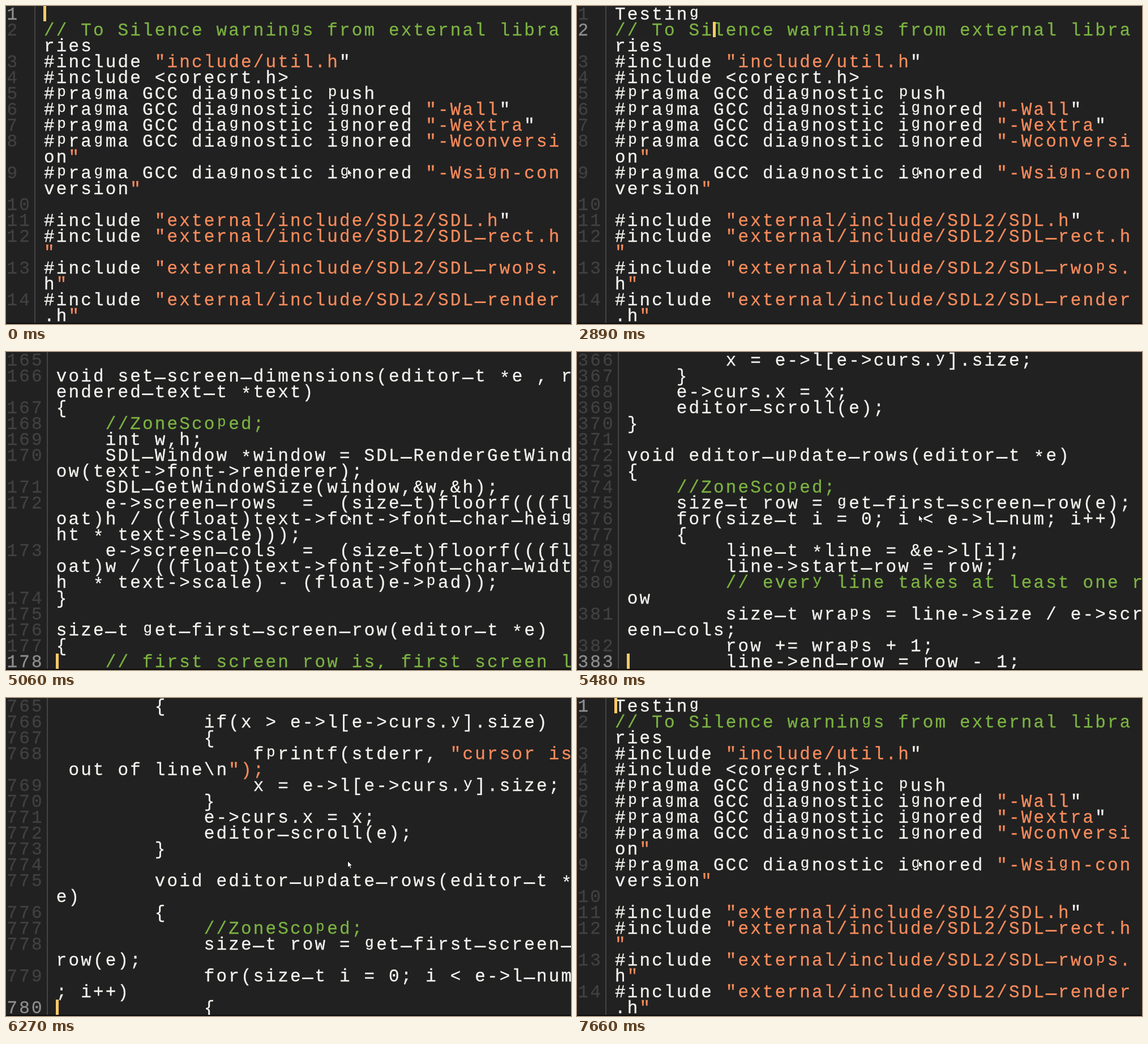
Animation of 998x561 px, one loop 8 s. Source, as an HTML page:

```html
<!DOCTYPE html>
<html lang="en">
<head>
<meta charset="utf-8">
<title>Code editor</title>
<style>
  html, body { margin: 0; width: 100%; height: 100%; overflow: hidden; background: #212121; }
  #stage { position: relative; width: 998px; height: 561px; overflow: hidden; background: #212121; }
  #stage div { position: absolute; }
  #text {
    left: 0; top: 0; white-space: pre; color: #f4f4f0; letter-spacing: 3.147px;
    font: 31px/28px "Liberation Mono", "DejaVu Sans Mono", monospace;
    -webkit-text-stroke: .3px;
  }
  .num { left: 1.5px; color: #414141; }
  .num.on { color: #8e8e8e; }
  .note { color: #7cb342; }
  .str { color: #fa8c5c; }
  /* The typeface has no descenders, a raised underscore and a centred star. */
  .low { position: relative; font-size: 26px; line-height: 0; letter-spacing: 6.147px; left: 1.5px; top: -4.5px; }
  .bar { position: relative; top: -7.5px; -webkit-text-stroke: 1.2px; }
  .star { position: relative; top: 4px; }
  #rule { top: 0; width: 2px; height: 559px; background: #444; }
  #caret { width: 5px; height: 27px; background: #ffcb66; }
  #edge { left: 0; top: 559px; width: 998px; height: 2px; background: #0d0d0d; }
  #mouse { position: absolute; left: 602px; top: 286px; }
</style>
</head>
<body>
<div id="stage">
  <div id="text"></div>
  <div id="rule"></div>
  <div id="caret"></div>
  <svg id="mouse" width="13" height="18" viewBox="0 0 13 18">
    <path d="M1.5 1.5V13L4.3 10.6L6.2 15L8.2 14.1L6.3 9.9H10Z" fill="#fff" stroke="#111"/>
  </svg>
  <div id="edge"></div>
</div>
<script>
const LOOP = 8000, CELL = 21.75, LINE = 28, ROWS = 20;
const $ = id => document.getElementById(id);
const pad = (n, s) => ' '.repeat(n) + s;
const sdl = name => `#include "external/include/SDL2/SDL${name}.h"`;
const ignored = flag => `#pragma GCC diagnostic ignored "-W${flag}"`;

const head = [
  '// To Silence warnings from external libraries',
  '#include "include/util.h"',
  '#include <corecrt.h>',
  '#pragma GCC diagnostic push',
  ...['all', 'extra', 'conversion', 'sign-conversion'].map(ignored),
  '',
  ...['', '_rect', '_rwops', '_render'].map(sdl)
];

const includes = ['h"', ...['events', 'image', 'surface', 'timer', 'scancode', 'video',
  'keycode', 'pixels', 'ttf', 'scancode'].map(name => sdl('_' + name))];

const floatOf = (size, gap) => `((float)text->font->font_char_${size}${gap}* text->scale)`;
const dimensions = [
  '',
  'void set_screen_dimensions(editor_t *e , rendered_text_t *text)',
  '{',
  '    //ZoneScoped;',
  '    int w,h;',
  '    SDL_Window *window = SDL_RenderGetWindow(text->font->renderer);',
  '    SDL_GetWindowSize(window,&w,&h);',
  `    e->screen_rows  =  (size_t)floorf(((float)h / ${floatOf('height', ' ')}));`,
  `    e->screen_cols  =  (size_t)floorf(((float)w / ${floatOf('width', '  ')} - (float)e->pad));`,
  '}',
  '',
  'size_t get_first_screen_row(editor_t *e)',
  '{',
  '    // first screen row is, first screen l'
];

const keyTest = key => `ray[SDL_SCANCODE_LCTRL]) && (keyboard_state_array[SDL_SCANCODE_${key}]))`;
const keys = [
  keyTest('RIGHT'),
  pad(16, '{'),
  pad(20, 'move_cursor_to_next_word(e);'),
  pad(16, '}'),
  pad(16, 'else if((keyboard_state_ar') + keyTest('PAGEDOWN'),
  pad(16, '{'),
  pad(20, 'for (size_t i =0 ; i< e->screen_rows;i++) {'),
  pad(24, 'if(e->curs.y < e->l[e->l_num-1].end_row){'),
  pad(28, 'move_cursor_down(e);'),
  pad(28, 'editor_scroll(e);'),
  pad(24, '}else{'),
  pad(28, 'break;')
];

const setCaret = (field, value) => `    text->curs->${field} = (int) floorf(${value});`;
const font = size => `text->font->font_char_${size} * text->scale`;
const caretCode = [
  '+ e->l[e->l_off].row_off));',
  '',
  '    // cursor position on screen is cursor absolute position minus the offset',
  '    size_t cursor_screen_pos = e->curs.y - (screen_row_start + e->l[e->l_off].row_off);',
  '',
  setCaret('x', font('width') + ' *  (e->curs.x + e->pad)') + '  // x is same as we do text wrapping',
  setCaret('y', font('height') + ' * cursor_screen_pos'),
  setCaret('w', `(${font('width')}) / 4`),
  setCaret('h', font('height')),
  '}'
];

// Filler code for the pages that fly past.
const filler = [
  'void editor_update_rows(editor_t *e)',
  '{',
  '    //ZoneScoped;',
  '    size_t row = get_first_screen_row(e);',
  '    for(size_t i = 0; i < e->l_num; i++)',
  '    {',
  '        line_t *line = &e->l[i];',
  '        line->start_row = row;',
  '        // every line takes at least one row',
  '        size_t wraps = line->size / e->screen_cols;',
  '        row += wraps + 1;',
  '        line->end_row = row - 1;',
  '        if(line->end_row > e->curs.y)',
  '        {',
  '            e->l_off = i;',
  '            break;',
  '        }',
  '    }',
  '}',
  '',
  'void editor_move_cursor(editor_t *e, size_t x)',
  '{',
  '    if(x > e->l[e->curs.y].size)',
  '    {',
  '        fprintf(stderr, "cursor is out of line\\n");',
  '        x = e->l[e->curs.y].size;',
  '    }',
  '    e->curs.x = x;',
  '    editor_scroll(e);',
  '}',
  ''
];

function wrap(lines, first) {
  return lines.flatMap((line, i) =>
    (line.match(/.{1,42}/g) || ['']).map((text, part) => ({ num: first + i, text, part })));
}

function passing(last) {
  const indent = last > 400 && last < 940 ? 8 : 0;
  const lines = Array.from({ length: ROWS }, (_, i) =>
    pad(indent, filler[(last - ROWS + 1 + i) % filler.length]));
  return wrap(lines, last - ROWS + 1).slice(-ROWS);
}

const word = 'Testing ';
const home = typed => wrap([typed, ...head], 1);

// Each step: time, page rows, caret row, caret column.
const steps = [];
const add = (time, rows, row = ROWS - 1, col = 0) => steps.push({ time, rows, row, col });
const type = (time, n) => add(time, home(word.slice(0, n)), 0, n);
const fly = pairs => pairs.forEach(([time, last]) => add(time, passing(last)));

[[0, 0], [690, 1], [960, 2], [1230, 3], [1510, 5], [1810, 6], [1930, 7], [2060, 8]]
  .forEach(([time, n]) => type(time, n));
[[2890, 1], [3420, 4], [3550, 7], [3670, 10]]
  .forEach(([time, row]) => add(time, home(word), row, 8));
add(4370, wrap(includes, 15));
fly([[4800, 76], [4930, 127]]);
add(5060, wrap(dimensions, 165));
fly([[5230, 246], [5350, 314], [5480, 383], [5600, 451], [5730, 519], [5850, 588]]);
add(6000, wrap(keys, 645));
fly([[6120, 718], [6270, 780], [6390, 842], [6540, 905]]);
add(6660, wrap(caretCode, 958));
fly([[6790, 1021], [7220, 1036]]);
add(7660, home(word), 0, 0);

const span = (cls, html) => `<span class="${cls}">${html}</span>`;

function glyphs(text) {
  return text.replace(/[<>&gpqy_*]/g, c => {
    if (c === '<') return '&lt;';
    if (c === '>') return '&gt;';
    if (c === '&') return '&amp;';
    return span(c === '_' ? 'bar' : c === '*' ? 'star' : 'low', c);
  });
}

// Colours run per screen row, so wrapped comments and strings lose theirs.
function paint(text) {
  return text.split(/(\/\/.*|"[^"]*"?)/).map((part, i) => {
    if (i % 2 === 0) return glyphs(part);
    if (part[0] === '/') return span('note', glyphs(part));
    const closed = part.length > 1 && part.endsWith('"');
    return span('str', glyphs(closed ? part.slice(0, -1) : part)) + (closed ? '"' : '');
  }).join('');
}

function draw({ rows, row, col }) {
  const digits = String(rows[rows.length - 1].num).length;
  const shift = (digits - 2) * CELL;
  const current = rows[row].num;
  $('text').innerHTML = rows.map(({ num, text, part }, i) => {
    const top = `top:${i * LINE + 1.5}px`;
    const label = part === 0 || i === 0
      ? `<div class="num${num === current ? ' on' : ''}" style="${top}">${num}</div>` : '';
    return `${label}<div style="${top};left:${67 + shift}px">${paint(text)}</div>`;
  }).join('');
  $('rule').style.left = 50 + shift + 'px';
  $('caret').style.left = 66 + shift + col * CELL + 'px';
  $('caret').style.top = row * LINE + 'px';
}

let shown = null;
function tick() {
  const t = performance.now() % LOOP;
  const step = steps.filter(s => s.time <= t).pop();
  if (step !== shown) draw(shown = step);
  requestAnimationFrame(tick);
}
tick();
</script>
</body>
</html>
```
